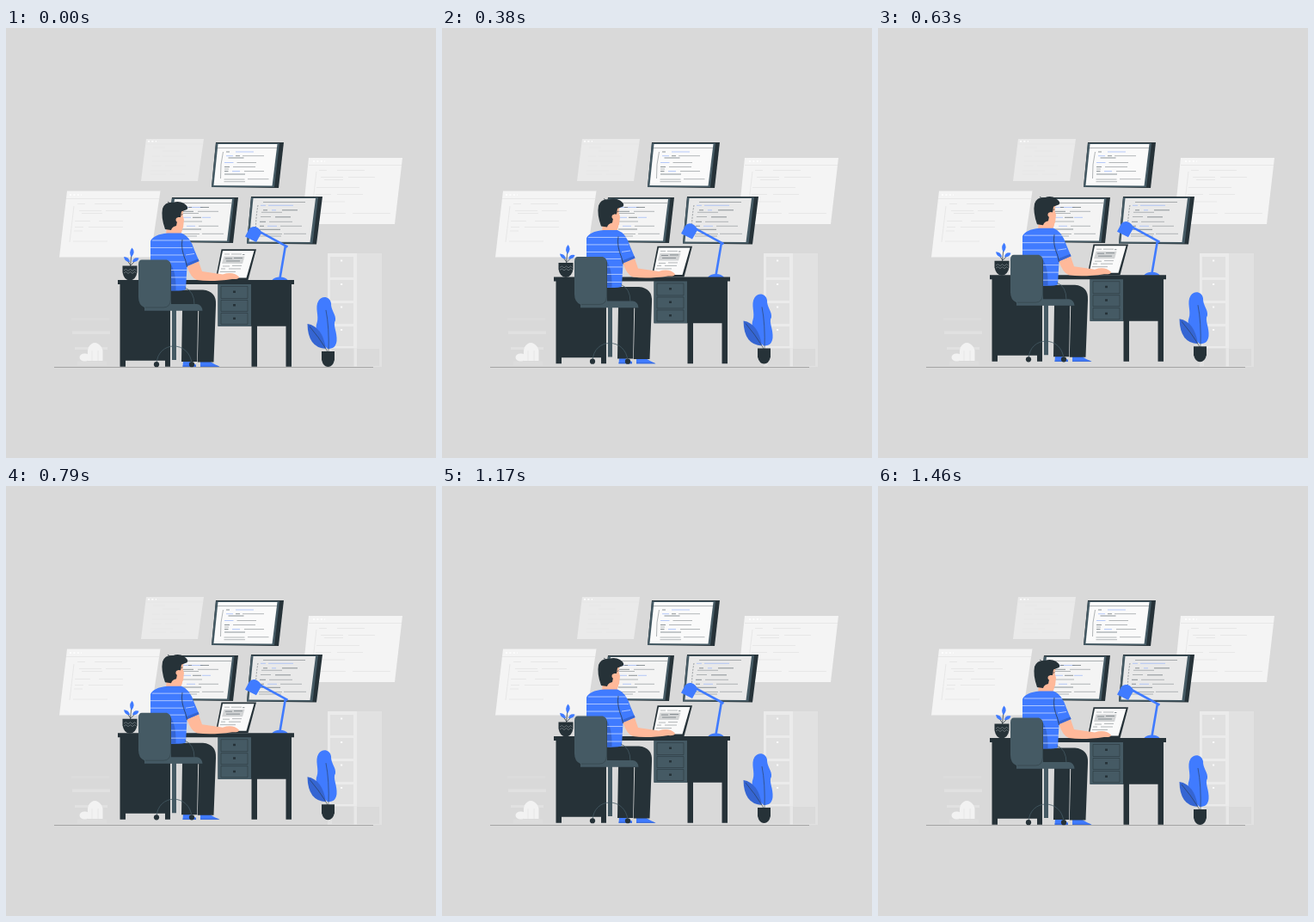
These frames come from a looping animation (500 px wide and 500 px high, 1500 ms). An HTML page:

```html
<!DOCTYPE html>
<html lang="en">
<head>
<meta charset="utf-8">
<title>Developer at a desk</title>
<style>
  html, body { margin: 0; width: 100%; height: 100%; overflow: hidden; background: #d9d9d9; }
  svg { display: block; width: 100vw; height: 100vh; }
  .dark { fill: #263238; }
  .slate { fill: #455a64; }
  .blue { fill: #407bff; }
  .navy { fill: #3565d2; }
  .skin { fill: #ffb99a; }
  .paper { fill: #fafafa; }
  .line { fill: none; stroke: #263238; stroke-width: .7; }
  .wire { fill: none; stroke: #455a64; stroke-width: .8; }
  .code { fill: none; stroke: #a0a5a8; stroke-width: .8; }
  .code.hi { stroke: #a3bcf8; }
  .code.ink { stroke: #737c81; }
  .ghost { fill: none; stroke: #e4e4e4; stroke-width: .8; }
  .dots { fill: none; stroke: #fff; stroke-width: 1.6; stroke-dasharray: 2 2.4; }
</style>
</head>
<body>
<svg viewBox="0 0 500 500">
  <!-- Faded windows -->
  <g>
    <path fill="#eaeaea" d="M163 129H230L223 178H157Z"/>
    <path class="dots" d="M165 131.7h10"/>
    <path class="ghost" d="M162 135H229M171 139h14M182 143h20M170 149h9M182 149h27M170 155h30M169 160h12M185 160h24M168 166h26M168 170h18M191 170h17"/>
    <path fill="#f4f4f4" d="M352 151H461L452 228H344Z"/>
    <path class="dots" d="M357 155h14"/>
    <path class="ghost" d="M352 159.500H460M364 165.500h9M385 165.500h32M366 173.500h26M398 173.500h31M370 176.500h22M361 185.500h50M360 193.500h18M385 193.500h30M358 202h36M357 215.500h38M403 215.500h44M361 167l-5 43"/>
    <path fill="#f4f4f4" d="M71 189.500H179.500L168 266.500H62Z"/>
    <path class="dots" d="M74 194h14"/>
    <path class="ghost" d="M70 198.500H178M83 204.500h9M103 204.500h32M85 212.500h26M116 212.500h29M88 215.500h24M80 224.500h18M108 224.500h28M80 231.500h10M96 231.500h40M79 236h10M78 248h40M79 207l-5 42"/>
  </g>

  <!-- Pale furniture -->
  <g>
    <path fill="#e1e1e1" d="M374 262H437V394H374Z"/>
    <path fill="#ebebeb" d="M374 262H408V372H374Z"/>
    <path fill="#e0e0e0" d="M377 266h27v24h-27ZM377 293h27v24h-27ZM377 320h27v24h-27ZM377 347h27v23h-27Z"/>
    <path fill="#dadada" d="M379 373H434V393H379Z"/>
    <path fill="#e7e7e7" d="M404.500 372h3.500v22h-3.500Z"/>
    <path fill="none" stroke="#fafafa" stroke-width="2.200" d="M389 270.500h2.200M389 298h2.200M389 324.500h2.200M389 351h2.200"/>
    <path fill="#dcdcdc" d="M76 337h44v3H76ZM83 387.500h34v5H83Z"/>
    <path fill="#e1e1e1" d="M77 352.500h44v3.500H77ZM80 371h38v3H80Z"/>
    <path fill="#f2f2f2" d="M96 371Q103 361 111 371L112.500 375V387H95V375Z"/>
    <ellipse fill="#f2f2f2" cx="91.500" cy="383" rx="6" ry="4.500"/>
    <path class="ghost" d="M100 375v12M107 375v12"/>
  </g>

  <path d="M56 394.500H427" stroke="#999" stroke-width=".8"/>

  <!-- Top monitor -->
  <g>
    <path class="dark" d="M244 133H323L317 186L239 185Z"/>
    <path class="slate" d="M244 134H318L312 185L239 185Z"/>
    <path class="paper" d="M246.500 135H315.500L309.500 183.500L241.500 183Z"/>
    <path class="line" stroke-opacity=".5" d="M246 139.500H315M252.500 144Q249 158 249.500 175"/>
    <path class="code" d="M275 148.700h25M268.500 156.500h22.500M264 161.500h26M254 164h5M277 166.500h23M253.500 176h24M281 175.700h24.500M253.500 178.700h24.500"/>
    <path class="code hi" d="M267 144h21M256 148.700h8M254 156.500h10.500M263 166.500h9"/>
    <path class="code ink" d="M256 144h4M267 148.700h5M258.500 151h18M254 161.500h6M254 166.500h4.500M254 170h24"/>
  </g>

  <!-- Left monitor -->
  <g>
    <path class="dark" d="M193 197H270L264 250L187 249Z"/>
    <path class="slate" d="M193 198H265.500L259.500 249L187 249Z"/>
    <path fill="#f4f4f4" d="M196 199H263L257 247.500L190 247Z"/>
    <path class="line" stroke-opacity=".5" d="M195 203.500H262"/>
    <path class="code" d="M223 213.300h24M206 215.500h18M205 225h23M224 230.300h23M203 239.500h22M228 239.300h25M203 242h19"/>
    <path class="code hi" d="M205 208.500h24M205 220.300h10M228 220.300h10M210 230.300h10"/>
    <path class="code ink" d="M212 208.500h4M226 208.500h10M205 213.300h13M217 220.300h10M205 234h22"/>
  </g>

  <!-- Right monitor -->
  <g>
    <path class="dark" d="M285 196H368L361 251.500L280 250.500Z"/>
    <path class="slate" d="M285 197H363L356.500 250.500L280 250.500Z"/>
    <path fill="#e9e9e9" d="M287.500 198H360L353.500 249L282.500 248.500Z"/>
    <path class="line" stroke-opacity=".5" d="M299 202.500H348"/>
    <path class="line" stroke-dasharray="2 1.500" stroke-opacity=".6" d="M293 206Q290 222 290.500 241"/>
    <path class="code" d="M297 214.300h24M296 219.500h12M306 225.300h27M319 230.300h25M294 239.500h27M323 239.300h26M294 242h26"/>
    <path class="code hi" d="M296 206.300h6M305 206.300h29M309 211.800h5M304 230.300h11"/>
    <path class="code ink" d="M299 211.800h5M321 211.800h18M313 219.800h18M295 225.300h7M295 230.300h5M295 234.300h24"/>
  </g>

  <g id="floating">
    <!-- Small plant -->
    <path class="line" d="M144.500 277L146 262M145 276L140 269M145 276L150 271"/>
    <path class="blue" d="M146.500 255.500Q151 260 146 266.500Q142 261 146.500 255.500ZM137 266Q143 266 144 272Q138 272 137 266ZM154.500 267.500Q148 266 147 272Q153 272.500 154.500 267.500Z"/>
    <path class="dark" d="M135.500 276.500H152.500V284Q151 293 144 293.500Q137 293 135.500 284Z"/>
    <path fill="none" stroke="#8f999e" stroke-width=".6" d="M137 282l2.500-1.500 2.500 2 2.500-2 2.500 2 2.500-2 2 1.500M137 285l2.500-1.500 2.500 2 2.500-2 2.500 2 2.500-2 2 1.500"/>

    <!-- Lamp -->
    <path fill="none" stroke="#407bff" stroke-width="2.600" d="M318.500 291L324.800 254M327.500 254.700L294 236.500"/>
    <path class="blue" d="M309 293.500Q312 289.500 318.500 289.500T328 293.500ZM278 242.500L282.500 234Q285 230.500 290 231Q296 233 297 238.500L291 249Z"/>

    <!-- Laptop -->
    <path class="dark" d="M250.500 257.300H291L281.500 293H243.500Z"/>
    <path class="paper" d="M252 259H288.500L279.500 290.500H245.500Z"/>
    <path fill="#d2d4d5" d="M253.500 265.500H277.500L275 274H251Z"/>
    <path class="code" d="M254 263h6M262 263h12M252 277h8M263 276.500h11M250 280h5M259 280h14M249 283.500h18"/>
    <path class="code ink" d="M255 268h8M265 267.500h10M256 271h16M275 263.500h2.500"/>

    <!-- Desk -->
    <path class="dark" d="M130 293H335V298H332V393.700H325.500V346.700H292V393.700H285.500V346.700H246.500V298H191V393.700H185V386.700H139V393.700H132.500V298H130Z"/>
    <path class="slate" d="M246.500 298H285V346.700H246.500Z"/>
    <path class="line" stroke-opacity=".7" d="M250 300.500h31v14h-31ZM250 316.500h31v13h-31ZM250 331.500h31v13h-31Z"/>
    <path class="dark" d="M264 305.500h3v2.500h-3ZM264 321h3v2.500h-3ZM264 336.500h3v2.500h-3Z"/>

    <!-- Legs and shoes -->
    <path class="blue" d="M206 387H212L221 391.500V393.700H205.500ZM226 387H236Q242 391 248.500 393.700H226Z"/>
    <path class="navy" d="M205.500 392.500H221V393.700H205.500ZM226 392.700H246L248.500 393.700H226Z"/>
    <path class="dark" d="M188 304.500H229Q245 306 244 322L241.500 388.500H222.800L224.200 329H223.200L222.200 388H204L205 328H188Z"/>

    <!-- Arm and neck -->
    <path class="skin" d="M210 276L223.500 270L228 283L252 286.500Q264 282.500 271 289.500Q271 292.500 263 292Q238 295.500 222 293Q215 291 210 276ZM187 230H205V235L203 240H186Z"/>

    <!-- Shirt -->
    <path class="blue" d="M168 248Q171 240 188 238.500H204Q214 242 219 258L224.500 271L210.500 277L209 304Q206 306 190 305.500H168Z"/>
    <path class="navy" d="M191 274Q198 283 197.500 305H191ZM209.500 274L223.500 268.500L224.500 271L210.500 277Z"/>
    <path fill="none" stroke="#c9daff" stroke-width=".8" d="M170 247H214M168 255.500H217M168 264H207M209 264L219 262.500M168 272H208M191 281.500H210M191 290H210M191 299H209"/>
    <path class="line" d="M205 246Q203 257 209 271L210.500 278"/>

    <!-- Head -->
    <path class="skin" d="M197 211H206.500L205.500 218L207 223L206 232Q204 236 196 234L187 230Z"/>
    <path class="dark" d="M185 234Q180 220 182 210Q185 202 194 203Q201 200.500 207 204Q213 208 210.500 211L204 213.500L203 220H200L198 230Q193 231 192 235Z"/>
    <circle class="skin" cx="200.300" cy="223" r="2.800"/>
    <path class="line" d="M203.500 217.500l2-.8M188 202l3 2"/>

    <!-- Chair -->
    <path class="wire" d="M208 302Q219 306 219 322"/>
    <path class="slate" d="M193 328H198V386H193ZM158 269.500H187Q192 271.500 192 276.500V321H222Q228 322 228.500 328.700H161V325Q154 322 154 313V275Q154 269.500 158 269.500Z"/>
    <path class="line" stroke-opacity=".55" d="M191.500 275V316Q191 325 183 325H162"/>
    <path class="wire" d="M175 391C176 363 214 363 216 391"/>
    <circle class="dark" cx="175" cy="391.200" r="3.100"/>
    <circle class="dark" cx="216" cy="391.200" r="3.100"/>

    <!-- Floor plant -->
    <path class="blue" d="M374 373C366 366 358 352 361.500 343C364.500 335 358.500 325 363.500 317C367.500 311 376.500 312 378 320C377.500 328 384 333 383 340C379.500 345 385.500 354 384.500 364C383.500 371 380 373 374 373Z"/>
    <path class="navy" d="M350.500 344Q368 347 372 373Q351 372 350.500 344Z"/>
    <path class="line" stroke-opacity=".75" d="M372 328Q376 348 375 377M353 347Q364 360 372 373L374 377"/>
    <path class="dark" d="M367 376H382V386Q380 394 374.500 394T367 386Z"/>
  </g>
</svg>
<script>
  const LOOP = 1500, LIFT = 6, LEAD = 40;
  const floating = document.getElementById('floating');

  function draw(now) {
    const phase = (now + LEAD) % LOOP / LOOP;
    const y = -LIFT * (1 - Math.cos(2 * Math.PI * phase)) / 2;
    floating.setAttribute('transform', `translate(0 ${y.toFixed(3)})`);
  }

  const start = performance.now();
  function tick() {
    draw(performance.now() - start);
    requestAnimationFrame(tick);
  }
  tick();
</script>
</body>
</html>
```
